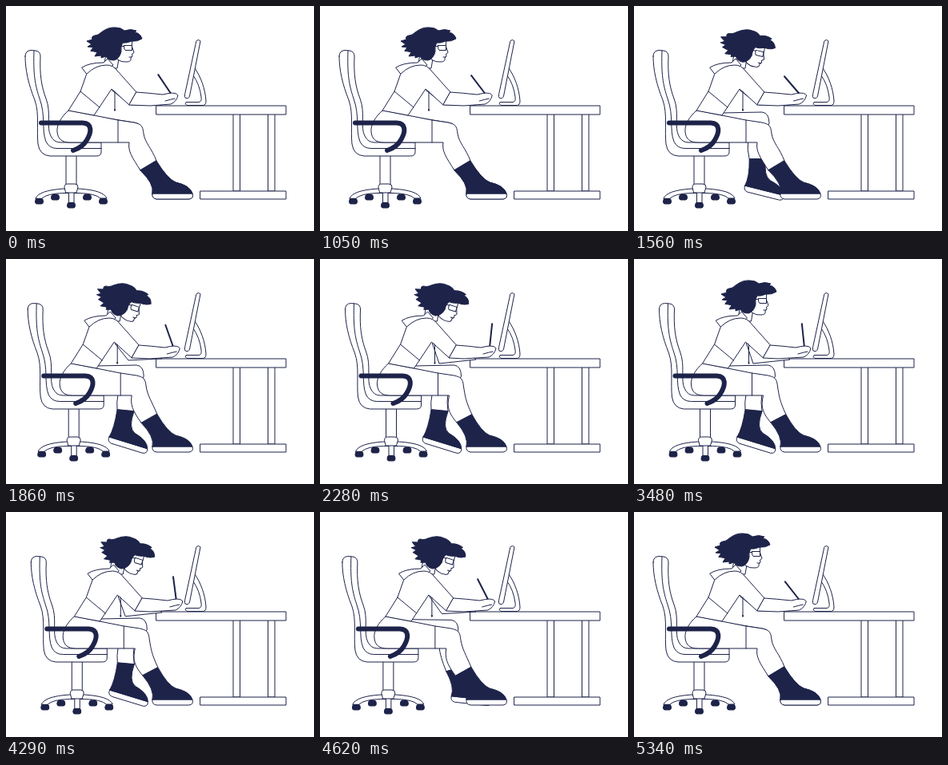
Write an HTML page that moves like this. It is 385x282 px and loops after 5370 ms.

```html
<!DOCTYPE html>
<html lang="en">
<head>
<meta charset="utf-8">
<title>Working at the desk</title>
<style>
html, body { margin: 0; width: 100%; height: 100%; overflow: hidden; background: #fff; }
svg { display: block; width: 385px; height: 282px; }
path { fill: #fff; stroke: #1d2349; stroke-width: 1; stroke-linejoin: round; stroke-linecap: round; }
.dark { fill: #1d2349; }
.line { fill: none; }
.pen { fill: none; stroke-width: 2; }
.rest { fill: none; stroke-width: 6; }
</style>
</head>
<body>
<svg viewBox="0 0 385 282">
  <g id="desk">
    <path d="M284 136V232H292.5V136M327.5 136V232H336V136"/>
    <path d="M188 125H350V136H188ZM243 232H350V242H243Z"/>
    <path d="M236 78C243 88 249 103 250 119Q250 124.500 246 124.500H226Q223 123 225 120.500H241Q245 120 244 114Q242 98 234 87Z"/>
    <path d="M238 44Q240 41 243 44L229.500 113Q228 117 224 115Q223 114 223.500 111Z"/>
  </g>
  <g id="chair">
    <path d="M75 188V226H88V188Z"/>
    <path class="dark" id="wheels"/>
    <path d="M37 241Q41 231 72 229H91Q122 231 126 241H118Q112 235 91 234.500H72Q51 235 45 241Z"/>
    <path d="M78.500 246V232H85V246Z"/>
    <path d="M73 227Q73 223 77 223H86Q90 223 90 227L88 234H75Z"/>
    <path d="M24 63Q24 56 31 55.500L37 56Q43 57 43 63C42 85 44 100 50 116C57 134 50 152 56 163Q60 171 68 171H119V183Q119 188 113 188H55Q42 187 40 173C38 155 42 135 36 118C28 98 24 80 24 63Z"/>
    <path class="line" d="M35 56C34 85 36 98 42 116C50 138 44 155 50 170Q54 178.500 64 178.500H119"/>
  </g>
  <path id="farThigh"/>
  <path id="farCalf"/>
  <path id="farSole"/>
  <path id="farShaft" class="dark"/>
  <path id="farArm"/>
  <path id="leg"/>
  <path id="sole"/>
  <path id="shaft" class="dark"/>
  <g id="body">
    <path class="line" d="M140 143V171"/>
    <path d="M125 60L122 78H139L141 66Z"/>
    <path d="M95 77Q104 71 122 71L127 66L134 74L120 86L101 85Z"/>
    <path d="M101 85Q112 74 126 74Q134 74 139 81L163 108L154 124L132 104L110 137L78 131L93 107Z"/>
    <path class="line" d="M93 107L117 127M136 107V131"/>
    <path class="pen" d="M136 130V130.500"/>
  </g>
  <g id="head">
    <path d="M143 42H157.500V51L160 58Q159 60 157.500 60L158 63L156 65Q157 70 151 70Q145 71 139 67Z"/>
    <path class="line" d="M154 64H157M143 50.500H147M147.500 49.500H157.500V55.500H149Q147 54 147.500 49.500"/>
    <path class="dark" d="M106 56L109 52L102 51L107 48L101 44L108 42Q106 38 111 37Q115 37 119 33Q128 26 137 27Q144 27 148 31Q156 28 163 31L161 33Q168 34 170 41Q164 45 157 44Q150 47 146 46Q143 50 144 57Q142 66 135 68Q127 68 125 63L119 65L119 62L111 63L114 58Z"/>
  </g>
  <path id="pen" class="pen"/>
  <path id="arm"/>
  <path id="thumb" class="line"/>
  <path id="rest" class="rest" d="M44 146.500H96C108 147 107 158 101 168Q96 177 84 181"/>
</svg>
<script>
const LOOP = 5370, BEAT = LOOP / 10;
const $ = id => document.getElementById(id);
const put = (id, d) => $(id).setAttribute('d', d);
const move = (id, value) => $(id).setAttribute('transform', value);
const mix = (a, b, k) => a + (b - a) * k;

// Eased step from 0 to 1
function ramp(t, start, end) {
  const k = Math.min(1, Math.max(0, (t - start) / (end - start)));
  return (1 - Math.cos(Math.PI * k)) / 2;
}

// Five casters in a shallow arc, every second one further back
let wheels = '';
for (let i = 0; i < 5; i++) {
  const y = i == 2 ? 246 : i % 2 ? 236 : 241;
  wheels += `M${39.5 + 20 * i} ${y}h4q3 0 3 4q0 3 -2 3h-6q-2 0 -2 -3q0 -4 3 -4z`;
}
put('wheels', wheels);

// A boot standing on its heel, turned by angle, reaching up to the cuff
function boot(sole, shaft, heelX, heelY, angle, cuffBack, cuffFront) {
  const c = Math.cos(angle), s = Math.sin(angle);
  const p = (x, y) => `${heelX + x * c - y * s} ${heelY + x * s + y * c} `;
  put(sole, `M${p(0, 0)}L${p(50, 0)}Q${p(52, 6)}${p(46, 7)}L${p(5, 7)}Q${p(-1, 6)}${p(0, 0)}Z`);
  put(shaft, `M${cuffBack}Q${p(3, -12)}${p(0, 0)}L${p(50, 0)}Q${p(47, -10)}${p(29, -14)}Q${p(19, -18)}${cuffFront}Z`);
}

function drawLegs(lean, foot, x) {
  const back = `${168 + 3 * lean} ${206 - lean}`, front = `${188 + 2 * lean} ${194 + lean}`;
  put('leg', `M${x(78)} 131C${x(69)} 139 ${x(63)} 149 ${x(64)} 158C${x(65)} 167 ${x(70)} 171 ${x(80)} 171
    H${x(154)}C${x(152)} 182 158 190 ${back}L${front}C182 178 ${x(174)} 172 ${x(172)} 160
    C${x(171)} 149 ${x(168)} 148 ${x(160)} 146L${x(140)} 143Z`);
  boot('sole', 'shaft', 183, 235, 0, back, front);

  const knee = 1 - (1 - foot) ** 4;
  put('farThigh', `M${x(110)} ${138 - 4 * knee}L${x(160)} ${146 - 13 * knee}
    Q${x(169)} ${147 - 13 * knee} ${x(169)} ${155 - 8 * knee}L${x(160)} 165H120Z`);
  const farBack = `${mix(168, 139, foot)} ${mix(206, 189, foot)}`;
  const farFront = `${mix(188, 160, foot)} ${mix(195, 191, foot)}`;
  put('farCalf', `M${mix(154, 140, foot)} 170Q${mix(156, 138, foot)} 180 ${farBack}
    L${farFront}Q${mix(180, 158, foot)} 180 ${mix(171, 160, foot)} 168Z`);
  boot('farSole', 'farShaft', mix(183, 129, foot), mix(235, 223, foot), .3 * foot, farBack, farFront);
}

function drawArm(t, lean, x) {
  // Writing stops for the one beat in which she looks up
  const stroke = Math.floor(t / BEAT) == 6 ? 0 : Math.sin(2 * Math.PI * t / BEAT);
  const tip = 207 + 6 * lean - stroke;
  const angle = (-34 + 28 * lean + 12 * stroke) * Math.PI / 180;
  put('farArm', `M${x(133)} 106L${156 - 7 * lean} ${124 + 7 * lean}L195 ${124 + 2 * lean}L180 115Z`);
  put('pen', `M${tip} 111L${tip + 30 * Math.sin(angle)} ${111 - 30 * Math.cos(angle)}`);
  put('arm', `M${x(163)} 108Q${x(178)} 109 ${tip - 11} 111L${tip - 4} 109.500
    Q${tip + 6} 108 ${tip + 8} 112Q${tip + 6} 120 ${tip - 1} 123L180 125L${x(154)} 124Z`);
  put('thumb', `M${tip - 8} 119Q${tip - 1} 117 ${tip + 4} 116`);
}

function draw(t) {
  const lean = ramp(t, 1630, 2140) - ramp(t, 4200, 5060);
  const foot = ramp(t, 1150, 1720) - ramp(t, 4250, 4870);
  const nod = ramp(t, 1150, 1750) - ramp(t, 2700, 3300) + ramp(t, 3600, 4200) - ramp(t, 4600, 5330);
  const shift = 7.5 * lean;
  const x = v => v + shift;

  for (const id of ['chair', 'body', 'rest']) move(id, `translate(${shift})`);
  move('head', `translate(${8 * lean}) rotate(${18 * nod} 126 73)`);
  drawLegs(lean, foot, x);
  drawArm(t, lean, x);
}

function tick(now) {
  draw(now % LOOP);
  requestAnimationFrame(tick);
}
draw(0);
requestAnimationFrame(tick);
</script>
</body>
</html>
```
